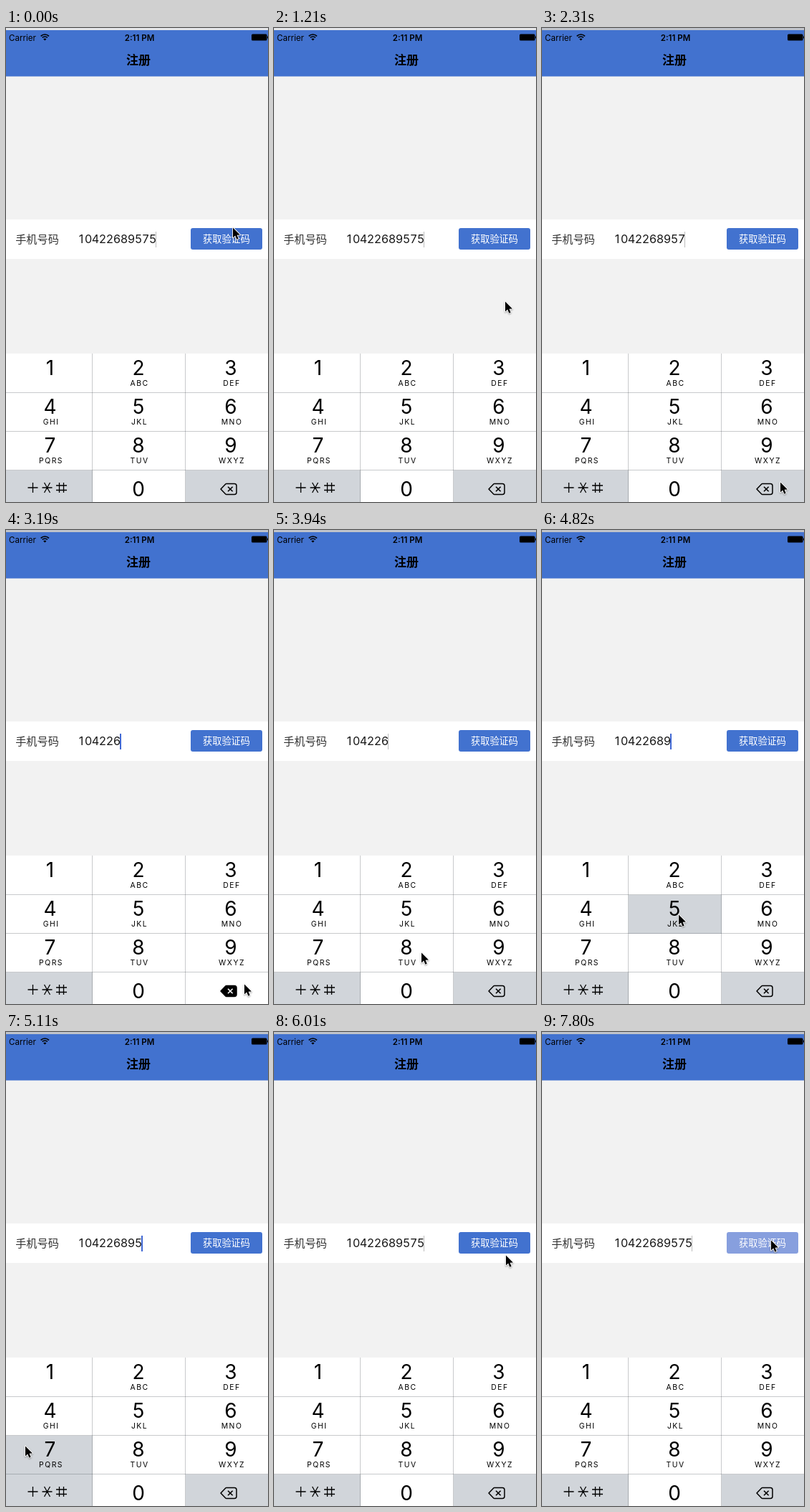
Write an HTML page with a canvas that moves like this. It is 366 px wide and 661 px high and loops after 8000 ms.

```html
<!DOCTYPE html>
<html lang="zh-CN">
<head>
<meta charset="utf-8">
<title>注册</title>
<style>
html, body { margin: 0; width: 100%; height: 100%; overflow: hidden; background: #f2f2f2; }
canvas { display: block; width: 366px; height: 661px; }
</style>
</head>
<body>
<canvas id="stage"></canvas>
<script>
const W = 366, H = 661, LOOP = 8000;
const canvas = document.getElementById('stage');
const ctx = canvas.getContext('2d');
const dpr = window.devicePixelRatio || 1;
canvas.width = W * dpr;
canvas.height = H * dpr;

const LATIN = 'Inter, Roboto, sans-serif';
const CJK = '"Noto Sans CJK SC", "Noto Sans CJK", sans-serif';
const BLUE = '#4272cf', GREY = '#d1d5da';
const NUMBER = '10422689575';
const LETTERS = ['', 'ABC', 'DEF', 'GHI', 'JKL', 'MNO', 'PQRS', 'TUV', 'WXYZ'];
const COL = [0, 121, 251, 366], MID = [61.5, 185, 314];
const ROW = [454, 509, 563, 617, 661];

// Pointer stops: time, x, y (the pointer jumps, it does not glide)
const PATH = [
  [0, 316, 277], [1070, 318, 300], [1210, 322, 380], [1360, 328, 500],
  [1500, 332, 600], [1720, 332, 632], [3790, 290, 620], [3940, 205, 588],
  [4230, 250, 586], [4370, 303, 584], [4670, 245, 550], [4820, 190, 535],
  [4960, 100, 560], [5110, 26, 576], [5260, 60, 560], [5410, 195, 528],
  [5860, 262, 400], [6010, 323, 310], [6160, 322, 300], [6310, 319, 289]
];

// Key taps: down, up, key
const TAPS = [
  [2020, 2310, 'del'], [2610, 2760, 'del'], [2900, 3040, 'del'],
  [3040, 3190, 'del'], [3190, 3340, 'del'], [4080, 4230, '8'],
  [4520, 4670, '9'], [4820, 4960, '5'], [5110, 5260, '7'], [5560, 5710, '5']
];
const CARET_ON = [[650, 1070], [1500, 2310], [2610, 3790], [4520, 6010], [6450, 6900], [7350, 7800]];
const BUTTON_DOWN = 6750;

const within = (t, [a, b]) => t >= a && t < b;

function rect(x, y, w, h, color) {
  ctx.fillStyle = color;
  ctx.fillRect(x, y, w, h);
}

function text(str, x, y, font, color = '#000', align = 'center', spacing = 0) {
  ctx.font = font;
  ctx.fillStyle = color;
  ctx.textAlign = align;
  ctx.letterSpacing = spacing + 'px';
  ctx.fillText(str, x + spacing / 2, y);
}

function lines(list, color, width) {
  ctx.strokeStyle = color;
  ctx.lineWidth = width;
  ctx.beginPath();
  for (const [x1, y1, x2, y2] of list) {
    ctx.moveTo(x1, y1);
    ctx.lineTo(x2, y2);
  }
  ctx.stroke();
}

function drawHeader(t) {
  rect(0, 0, W, 3, t < 2020 ? '#e4e5e8' : '#bfc3ca');
  rect(0, 3, W, 64.5, BLUE);
  text('Carrier', 4, 17.5, '11.6px ' + LATIN, '#000', 'left');
  text('2:11 PM', 186.5, 17.5, '600 11.5px ' + LATIN);

  // Wi-Fi
  ctx.strokeStyle = '#000';
  ctx.lineWidth = 1.7;
  for (const r of [8, 5]) {
    ctx.beginPath();
    ctx.arc(54.3, 17, r, -Math.PI * 0.75, -Math.PI * 0.25);
    ctx.stroke();
  }
  ctx.fillStyle = '#000';
  ctx.beginPath();
  ctx.moveTo(54.3, 17.6);
  ctx.arc(54.3, 17.6, 3, -Math.PI * 0.75, -Math.PI * 0.25);
  ctx.fill();

  // Battery
  ctx.beginPath();
  ctx.roundRect(343, 8.5, 21.5, 9, 1.5);
  ctx.fill();
  rect(365, 11.5, 1, 3, '#000');

  text('注册', 185, 51.2, '600 17px ' + CJK);
}

function drawForm(t) {
  rect(0, 267, W, 55, '#fff');
  text('手机号码', 43.5, 300.4, '15.2px ' + CJK, '#333');

  let count = NUMBER.length;
  for (const [down, up, key] of TAPS) {
    if (key === 'del' && t >= down) count--;
    if (key !== 'del' && t >= up) count++;
  }
  for (let i = 0; i < count; i++) {
    text(NUMBER[i], 105 + 10 * i, 300.3, '16.2px ' + LATIN, '#1a1a1a');
  }
  const on = CARET_ON.some(span => within(t, span));
  rect(99 + 10 * count, 284, on ? 2 : 1, 22, on ? '#4068d4' : '#bcbcbc');

  ctx.fillStyle = t >= BUTTON_DOWN ? '#879fde' : BLUE;
  ctx.beginPath();
  ctx.roundRect(258, 279, 100, 30, 3);
  ctx.fill();
  text('获取验证码', 308, 298.8, '13.2px ' + CJK, '#fff');
}

function drawDelete(pressed) {
  ctx.beginPath();
  ctx.moveTo(300, 643);
  ctx.lineTo(306.5, 636.2);
  ctx.lineTo(307.5, 635.6);
  ctx.lineTo(319, 635.6);
  ctx.arcTo(322, 635.6, 322, 639, 3);
  ctx.lineTo(322, 647.4);
  ctx.arcTo(322, 650.4, 319, 650.4, 3);
  ctx.lineTo(307.5, 650.4);
  ctx.lineTo(306.5, 649.8);
  ctx.closePath();
  ctx.lineJoin = 'round';
  ctx.lineWidth = 1.5;
  ctx.strokeStyle = ctx.fillStyle = '#000';
  if (pressed) ctx.fill();
  ctx.stroke();
  lines([[310, 639.7, 316.6, 646.3], [316.6, 639.7, 310, 646.3]], pressed ? '#fff' : '#000', 1.6);
}

function drawKeys(t) {
  const tap = TAPS.find(span => within(t, span));
  const pressed = tap ? tap[2] : '';
  rect(0, 454, W, H - 454, '#fff');
  const cell = (c, r) => rect(COL[c], ROW[r], COL[c + 1] - COL[c], ROW[r + 1] - ROW[r], GREY);

  cell(0, 3);
  if (pressed === 'del') {
    drawDelete(true);
  } else {
    cell(2, 3);
    drawDelete(false);
  }

  LETTERS.forEach((label, i) => {
    const c = i % 3, r = Math.floor(i / 3), digit = String(i + 1);
    if (pressed === digit) cell(c, r);
    text(digit, MID[c], 484 + 54 * r, '28px ' + LATIN);
    text(label, MID[c] + 0.8, 499 + 54 * r, '10.4px ' + LATIN, '#000', 'center', 1.5);
  });
  text('0', MID[1], 653.3, '28px ' + LATIN);

  const y = 641;
  lines([
    [30.5, y, 44.5, y], [37.5, y - 7, 37.5, y + 7],
    [50.5, y, 64.5, y], [53.5, y - 7, 61.5, y + 7], [61.5, y - 7, 53.5, y + 7],
    [70, y - 3, 85, y - 3], [70, y + 3.5, 85, y + 3.5],
    [74.5, y - 7, 74.5, y + 7], [80.5, y - 7, 80.5, y + 7]
  ], '#000', 1.3);

  const rule = 'rgba(60,64,72,0.28)';
  for (const x of [120, 250]) rect(x, 454, 1, H - 454, rule);
  for (const top of [508, 562, 616]) rect(0, top, W, 1, rule);
}

function drawPointer(t) {
  const [, x, y] = PATH.filter(p => p[0] <= t).pop();
  ctx.save();
  ctx.translate(x + 1, y + 1.5);
  ctx.beginPath();
  ctx.moveTo(0, 0);
  ctx.lineTo(0, 14);
  ctx.lineTo(3.2, 11);
  ctx.lineTo(5.4, 16.2);
  ctx.lineTo(7.7, 15.2);
  ctx.lineTo(5.6, 10.2);
  ctx.lineTo(10, 10);
  ctx.closePath();
  ctx.lineJoin = 'round';
  ctx.lineWidth = 1.8;
  ctx.strokeStyle = '#fff';
  ctx.shadowColor = 'rgba(0,0,0,0.35)';
  ctx.shadowBlur = 2 * dpr;
  ctx.shadowOffsetY = dpr;
  ctx.stroke();
  ctx.shadowColor = 'transparent';
  ctx.fillStyle = '#000';
  ctx.fill();
  ctx.restore();
}

function frame(now) {
  const t = now % LOOP;
  ctx.setTransform(dpr, 0, 0, dpr, 0, 0);
  rect(0, 0, W, H, '#f2f2f2');
  drawHeader(t);
  drawForm(t);
  drawKeys(t);
  drawPointer(t);
  requestAnimationFrame(frame);
}

frame(0);
</script>
</body>
</html>
```
